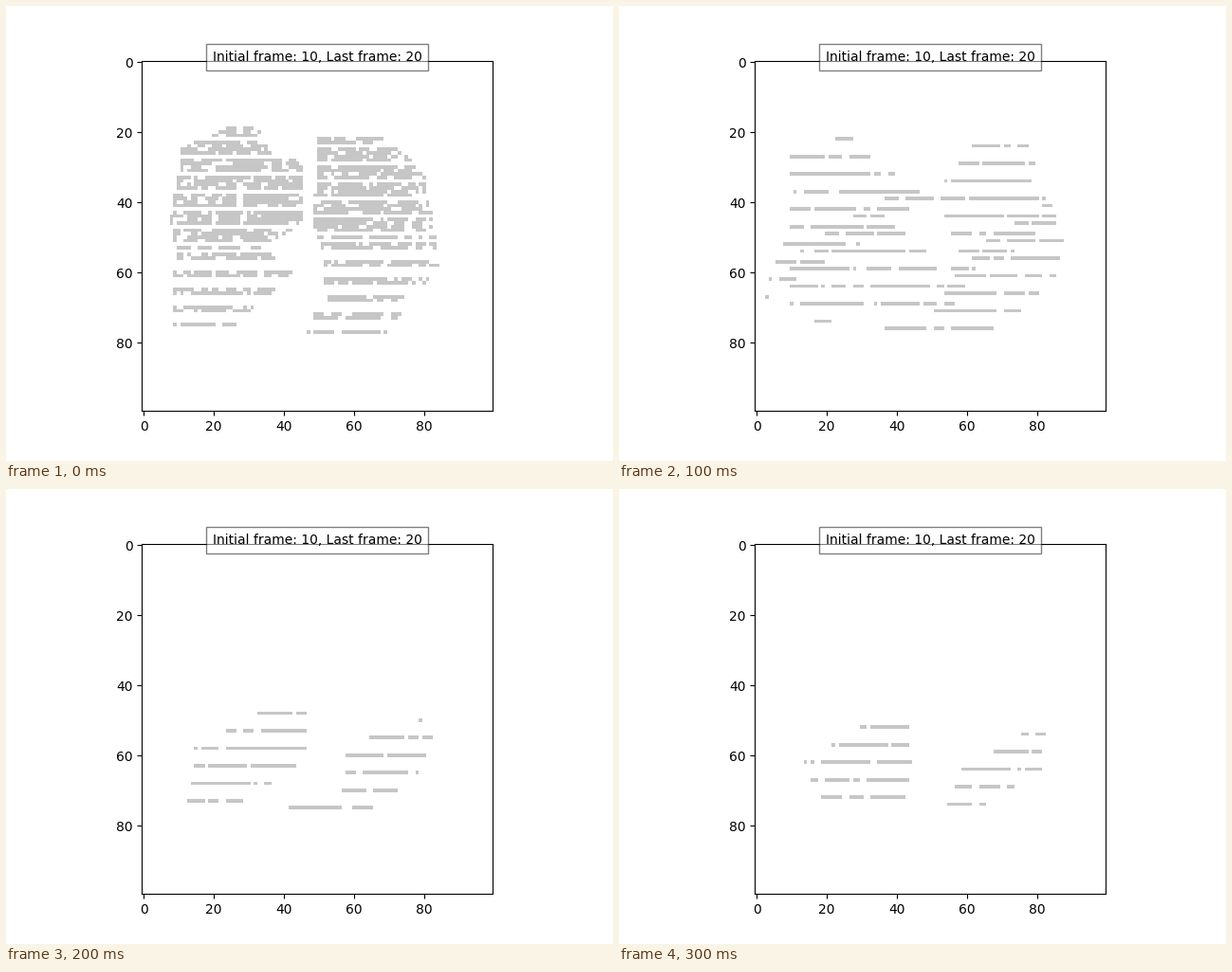
Recreate the animation shown at these times as a matplotlib script. Size 640 by 480 pixels, loop 0.4 s.

```python
import matplotlib.pyplot as plt
import numpy as np
from matplotlib.animation import FuncAnimation
from matplotlib.colors import ListedColormap

SIZE = 100
STEP = 5  # rows between two bars of one scan
GREY = "#c6c6c6"


def scan(grid, rng, outline, side, first=None, last=None, rate=0.1):
    """Draw bars every STEP rows inside an outline of (row, start, end)."""
    rows, starts, ends = zip(*outline)
    first = rows[0] if first is None else first
    last = rows[-1] if last is None else last
    for row in range(first, last + 1, STEP):
        a = round(np.interp(row, rows, starts))
        b = round(np.interp(row, rows, ends))
        grid[row, a:b] = 1
        # gaps gather towards the outer end of the bar
        for u in rng.random(round((b - a) * rate)) ** 1.6:
            depth = 1 + int(u * (b - a - 1))
            gap = a + depth if side == "left" else b - 1 - depth
            grid[row, gap:gap + rng.integers(1, 3)] = 0


def dense_grid():
    rng = np.random.default_rng(4)
    grid = np.zeros((SIZE, SIZE))
    left = [(19, 24, 33), (25, 11, 36), (29, 11, 46), (46, 8, 46),
            (53, 10, 34), (60, 9, 43), (75, 9, 27)]
    right = [(22, 50, 69), (30, 50, 80), (45, 49, 83), (58, 52, 85),
             (68, 53, 77), (77, 45, 70)]
    for first, last in (19, 49), (20, 75), (21, 71), (23, 53):
        scan(grid, rng, left, "left", first, last, 0.17)
    for first, last in (22, 77), (23, 73), (25, 50), (26, 46):
        scan(grid, rng, right, "right", first, last, 0.17)
    return grid


def scan_grid(seed, *lobes):
    """Each pair of outlines is one pass over the left and right lobe."""
    rng = np.random.default_rng(seed)
    grid = np.zeros((SIZE, SIZE))
    for i, outline in enumerate(lobes):
        scan(grid, rng, outline, ("left", "right")[i % 2])
    return grid


grids = [
    dense_grid(),
    scan_grid(
        9,
        [(22, 23, 29), (27, 10, 33), (37, 11, 47), (47, 10, 41),
         (57, 6, 20), (67, 3, 4)],
        [(24, 62, 78), (34, 54, 82), (39, 37, 83), (44, 54, 86),
         (54, 58, 74), (59, 56, 63), (69, 48, 57)],
        [(44, 28, 37), (54, 13, 49), (59, 10, 52), (69, 10, 47),
         (74, 17, 22)],
        [(41, 82, 85), (51, 66, 88), (61, 57, 86), (71, 51, 76),
         (76, 37, 68)],
    ),
    scan_grid(
        5,
        [(48, 33, 47), (58, 15, 47), (63, 15, 45), (73, 13, 29)],
        [(50, 79, 80), (55, 65, 83), (60, 58, 83), (70, 57, 75),
         (75, 42, 66)],
    ),
    scan_grid(
        2,
        [(52, 30, 44), (62, 14, 45), (72, 19, 43)],
        [(54, 76, 83), (64, 59, 82), (74, 55, 66)],
    ),
]

plt.rcParams["font.family"] = "DejaVu Sans"
fig, ax = plt.subplots(figsize=(6.4, 4.8), dpi=100)
image = ax.imshow(grids[0], cmap=ListedColormap(["white", GREY]),
                  vmin=0, vmax=1, interpolation="nearest")
ax.text(0.5, 1.0, "Initial frame: 10, Last frame: 20", ha="center",
        transform=ax.transAxes,
        bbox={"facecolor": "w", "alpha": 0.5, "pad": 5})


def update(i):
    image.set_data(grids[i])
    return [image]


anim = FuncAnimation(fig, update, frames=len(grids), interval=100,
                     repeat=True, repeat_delay=0, blit=False)
plt.show()
```
